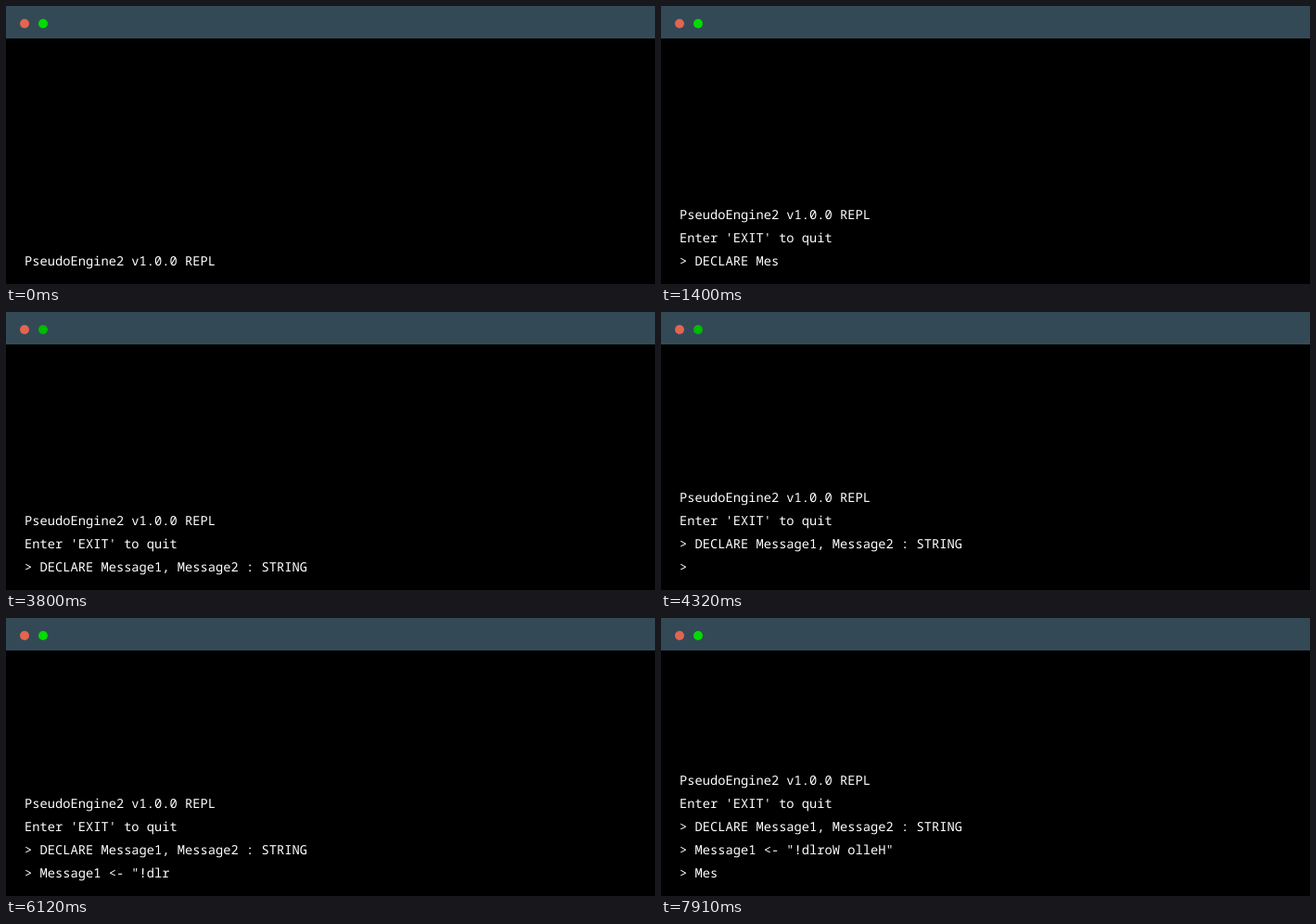
Write an HTML page that moves like this. It is 700x300 px and loops after 8000 ms.

```html
<!DOCTYPE html>
<html lang="en">
<head>
<meta charset="utf-8">
<title>REPL session</title>
<style>
  html, body { margin: 0; width: 100%; height: 100%; overflow: hidden; background: #000; }
  svg { display: block; width: 700px; height: 300px; }
  text {
    font: 13.745px "Noto Sans Mono", "DejaVu Sans Mono", monospace;
    fill: #fff;
    white-space: pre;
    text-rendering: geometricPrecision;
  }
</style>
</head>
<body>
<svg viewBox="0 0 700 300">
  <rect width="700" height="300"/>
  <rect width="700" height="35" fill="#344956"/>
  <circle cx="20" cy="19" r="5" fill="#e4654f"/>
  <circle id="green" cx="40" cy="19" r="5"/>
  <g id="rows"></g>
</svg>
<script>
const LOOP = 8000;
const KEY_MS = 100;
const LINE_HEIGHT = 25;
const BASELINE = 280;
const MAX_ROWS = 5;

// Each row scrolls in at `at`; typed rows start typing at `typeAt`.
const script = [
  { at: 0, text: "PseudoEngine2 v1.0.0 REPL" },
  { at: 100, text: "Enter 'EXIT' to quit" },
  { at: 200, typeAt: 200, text: "> DECLARE Message1, Message2 : STRING" },
  { at: 4120, typeAt: 4320, text: '> Message1 <- "!dlroW olleH"' },
  { at: 7310, typeAt: 7510, text: "> Message2" }
];

// Start time and brightness of the green light.
const greenLevels = [[0, 221], [2050, 170], [3250, 186], [4450, 170], [6000, 220]];

const green = document.getElementById("green");
const group = document.getElementById("rows");
const rows = Array.from({ length: MAX_ROWS }, (_, i) => {
  const row = document.createElementNS("http://www.w3.org/2000/svg", "text");
  row.setAttribute("x", 20);
  row.setAttribute("y", BASELINE - i * LINE_HEIGHT);
  return group.appendChild(row);
});

function visibleText({ typeAt, text }, t) {
  if (typeAt === undefined) return text;
  const count = Math.floor((t - typeAt) / KEY_MS) + 1;
  return text.slice(0, Math.max(0, count));
}

function render(t) {
  const shown = script.filter(line => line.at <= t).reverse();
  rows.forEach((row, i) => {
    const content = shown[i] ? visibleText(shown[i], t) : "";
    if (row.textContent !== content) row.textContent = content;
  });
  const level = greenLevels.filter(([start]) => start <= t).pop()[1];
  green.setAttribute("fill", `rgb(0 ${level} 0)`);
}

const start = performance.now();
function tick() {
  render((performance.now() - start) % LOOP);
  requestAnimationFrame(tick);
}
tick();
</script>
</body>
</html>
```
